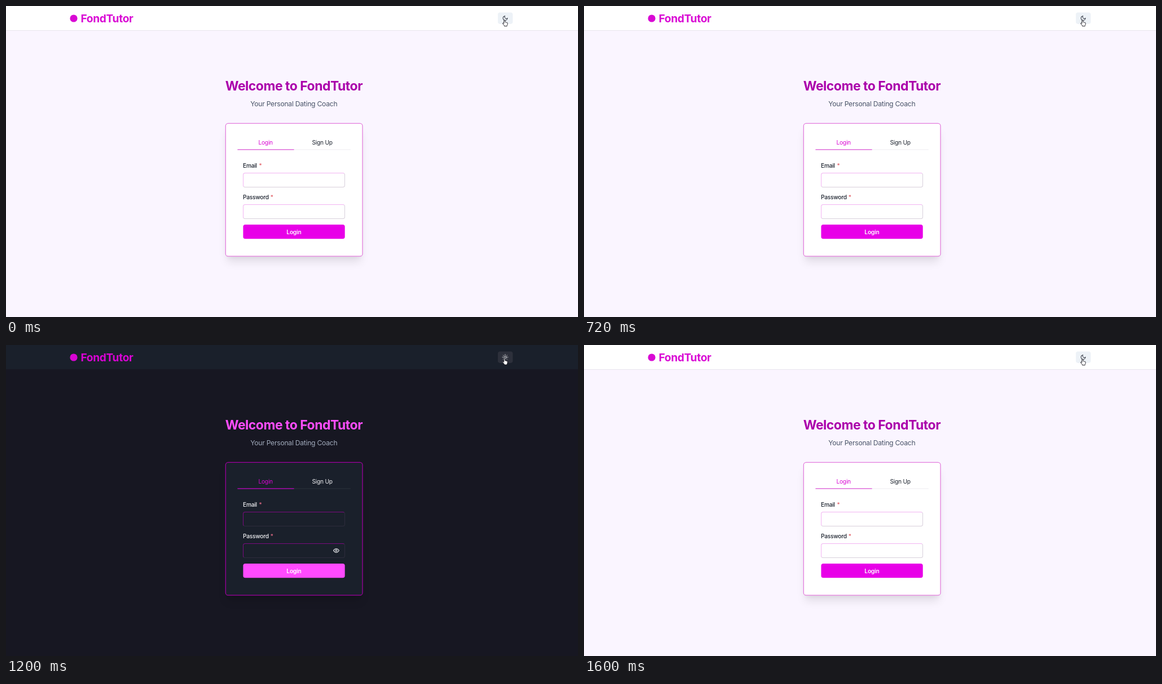
Recreate the animation shown at these times as an HTML page. Size 1014 px wide and 552 px high, loop 1.8 s.

```html
<!DOCTYPE html>
<html lang="en">
<head>
<meta charset="utf-8">
<title>Login theme toggle</title>
<style>
  html, body { margin: 0; width: 100%; height: 100%; overflow: hidden; }

  /* The theme flips hard at 1000 ms and back at 1500 ms. */
  @keyframes theme {
    0%, 83.333%, 100% {
      --page: #faf5ff; --panel: #fff; --rule: #e8e4ee; --chip: #edf2f7;
      --brand: #d908d4; --title: #ab00ab; --sub: #4a5568; --ink: #1a202c;
      --edge: #e37ddd; --tab: #dc4fd6; --track: #f1eff4;
      --field: #f2b4f2; --field2: #d8cfdb; --button: #e800e8; --star: #e0525a;
      --shade: rgba(0, 0, 0, .1); --day: 1; --night: 0; --lift: 0px;
    }
    55.555% {
      --page: #171722; --panel: #1a202b; --rule: #171722; --chip: #2d303b;
      --brand: #d904d4; --title: #ff4dff; --sub: #a0aabb; --ink: #f3f3f6;
      --edge: #a000a0; --tab: #c800c8; --track: #292f3a;
      --field: #7c0a80; --field2: #2d2c3c; --button: #ff4aff; --star: #f0708c;
      --shade: rgba(0, 0, 0, .13); --day: 0; --night: 1; --lift: -.7px;
    }
  }

  .stage {
    position: relative; width: 1014px; height: 552px; overflow: hidden;
    background: var(--page);
    animation: theme 1800ms step-end infinite;
  }
  .stage > * { position: absolute; box-sizing: border-box; }

  .bar { left: 0; top: 0; width: 1014px; height: 44px; background: var(--panel); border-bottom: 1px solid var(--rule); }
  .shadow {
    left: 389px; top: 208px; width: 243px; height: 236px; border-radius: 5px;
    box-shadow: 0 13px 16px -3px var(--shade), 0 6.5px 6.5px -3px rgba(0, 0, 0, .04);
  }
  .field {
    left: 420px; width: 181px; height: 26px; border-radius: 4px;
    border: 1px solid; border-color: var(--field) var(--field2) var(--field2) var(--field);
  }
  .email { top: 296px; }
  .password { top: 352px; }

  svg { left: 0; top: 0; }
  .chip { fill: var(--chip); }
  .card { fill: var(--panel); stroke: var(--edge); stroke-width: 1.27; }
  .track { fill: var(--track); }
  .tab { fill: var(--tab); }
  .button { fill: var(--button); }

  text { font: 10.2px Inter, sans-serif; letter-spacing: -.023em; fill: var(--ink); }
  .mid { text-anchor: middle; }
  .label { font-weight: 500; }
  .star { fill: var(--star); }
  .brand { font-size: 19.1px; font-weight: 700; letter-spacing: -.016em; fill: var(--brand); }
  .title { font-size: 22.9px; font-weight: 700; letter-spacing: -.02em; fill: var(--title); }
  .sub { font-size: 12.2px; fill: var(--sub); }
  .active { fill: var(--brand); }
  .action { font-weight: 600; fill: #fff; }
  .icon { fill: none; stroke: var(--ink); stroke-width: 2.2; stroke-linecap: round; stroke-linejoin: round; }
  .day { opacity: var(--day); }
  .night { opacity: var(--night); }
  .hand { fill: #fff; stroke: #15151c; stroke-width: .9; stroke-linejoin: round; transform: translateY(var(--lift)); }
</style>
</head>
<body>
<div class="stage">
  <div class="bar"></div>
  <div class="shadow"></div>

  <svg width="1014" height="552" viewBox="0 0 1014 552">
    <circle cx="120" cy="22" r="6.6" style="fill: var(--brand)"/>
    <text class="brand" x="132.5" y="29">FondTutor</text>
    <rect class="chip" x="871.9" y="11.5" width="26.5" height="20.4" rx="3.8"/>

    <text class="title mid" x="510.4" y="150.3">Welcome to FondTutor</text>
    <text class="sub mid" x="510.3" y="178">Your Personal Dating Coach</text>

    <rect class="card" x="389.3" y="208.4" width="242.7" height="235.8" rx="4.5"/>
    <rect class="track" x="410.4" y="254.3" width="200.4" height="1.2"/>
    <rect class="tab" x="410.4" y="254.3" width="100.2" height="1.2"/>
    <text class="active mid" x="460.2" y="246">Login</text>
    <text class="mid" x="560.6" y="246">Sign Up</text>

    <text class="label" x="420" y="286.7">Email</text>
    <text class="star" x="448.4" y="287">*</text>
    <text class="label" x="420" y="343">Password</text>
    <text class="star" x="468.8" y="343.3">*</text>
    <rect class="button" x="420.4" y="387.9" width="180.3" height="25.4" rx="3.8"/>
    <text class="action mid" x="510.4" y="404.5">Login</text>

    <g class="icon day" transform="translate(879.6 16.3) scale(.44)">
      <path d="M21 12.8A9 9 0 1 1 11.2 3 7 7 0 0 0 21 12.8z"/>
    </g>
    <g class="icon night" transform="translate(879.6 16.3) scale(.44)">
      <circle cx="12" cy="12" r="4.6"/>
      <path d="M12 1v2M12 21v2M1 12h2M21 12h2M4.2 4.2l1.4 1.4M18.4 18.4l1.4 1.4M4.2 19.8l1.4-1.4M18.4 5.6l1.4-1.4"/>
    </g>
    <g class="icon night" transform="translate(579.8 359.2) scale(.47)">
      <path d="M1.5 12C4 7.5 7.5 4.8 12 4.8S20 7.5 22.5 12C20 16.5 16.5 19.2 12 19.2S4 16.5 1.5 12z"/>
      <circle cx="12" cy="12" r="3.2"/>
    </g>

    <path class="hand" d="M882.6 31.2V26.1a1 1 0 0 1 2 0V28.6q.9-.6 1.5.3q.9-.5 1.5.4q1.3-.3 1.4 1V32.2q0 1.5-.9 2.4V35.8H883.4V34.8L880.5 31.4q-.5-1.1.5-1.3q.7 0 1.6 1.1z"/>
  </svg>

  <div class="field email"></div>
  <div class="field password"></div>
</div>
</body>
</html>
```
